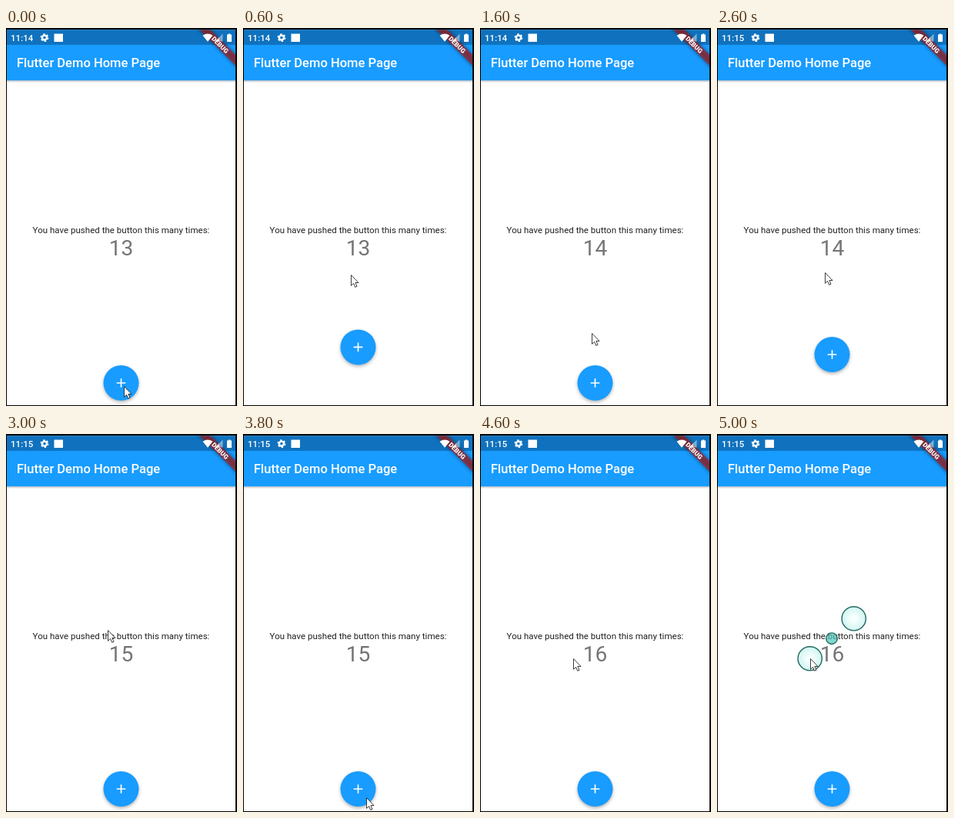
An HTML page for the animation above (5600 ms loop, 300 by 492 pixels).

```html
<!DOCTYPE html>
<html lang="en">
<head>
<meta charset="utf-8">
<title>Counter demo</title>
<style>
  html, body { margin: 0; width: 100%; height: 100%; overflow: hidden; background: #000; }
  svg { display: block; width: 300px; height: 492px; font-family: Roboto, sans-serif; }
  .medium { font-weight: 500; fill: #fff; }
  .mid { text-anchor: middle; }
  .fab { filter: drop-shadow(0 2px 2px rgba(0, 0, 0, .3)); }
  .soft { filter: blur(2.6px); }
</style>
</head>
<body>
<svg viewBox="0 0 300 492">
  <defs>
    <clipPath id="screen"><rect x="1" y="2.4" width="297" height="488.6"/></clipPath>
    <linearGradient id="barShadow" x2="0" y2="1">
      <stop stop-color="#000" stop-opacity=".24"/>
      <stop offset="1" stop-color="#000" stop-opacity="0"/>
    </linearGradient>
    <radialGradient id="glow">
      <stop offset=".2" stop-color="#f6fffe"/>
      <stop offset="1" stop-color="#c6f3ef"/>
    </radialGradient>
  </defs>

  <g clip-path="url(#screen)">
    <rect width="300" height="492" fill="#fff"/>
    <rect y="68" width="300" height="3.5" fill="url(#barShadow)"/>
    <rect width="300" height="68.2" fill="#189cff"/>
    <rect width="300" height="21.9" fill="#1072be"/>
    <text class="medium" x="14" y="51.3" font-size="16.55">Flutter Demo Home Page</text>

    <text class="mid" x="149.5" y="267.3" font-size="11.56" fill="#222">You have pushed the button this many times:</text>
    <text class="mid" id="count" x="149.5" y="296.1" font-size="28.1" fill="#757575">13</text>

    <g id="fab" class="fab">
      <circle cx="149.5" cy="462" r="23" fill="#189cff"/>
      <path d="M143.7 462h11.6M149.5 456.2v11.6" stroke="#fff" stroke-width="1.65"/>
    </g>

    <g transform="translate(298 2) rotate(45)">
      <rect class="soft" x="-40" y="23.2" width="80" height="9.9" opacity=".5"/>
      <rect x="-40" y="23.2" width="80" height="9.9" fill="#b71c1c" opacity=".63"/>
      <text class="mid" y="31.2" font-size="8.44" font-weight="900" fill="#fff">DEBUG</text>
    </g>

    <text class="medium" id="clock" x="6" y="17" font-size="11.6">11:14</text>
    <g fill="#fff">
      <circle cx="50" cy="12.6" r="3" fill="none" stroke="#fff" stroke-width="2.4"/>
      <circle cx="50" cy="12.6" r="4.5" fill="none" stroke="#fff" stroke-width="1.8" stroke-dasharray="2.4 2.312"/>
      <rect x="62.5" y="7.5" width="11.5" height="10.5"/>
      <path d="M255.5 9.8Q262 5.2 268.5 9.8L262 17.8Z"/>
      <path d="M281.5 7.5V17.5H271.5Z" opacity=".45"/>
      <path d="M277 12V17.5H271.5Z" opacity=".6"/>
      <path d="M287 8.6h1.7V7.4h2.6v1.2h1.7v9.4h-6z"/>
    </g>

    <g id="touch" stroke="#23685f" stroke-width="1.4">
      <circle cx="177.7" cy="240.3" r="15.6" fill="url(#glow)" fill-opacity=".85"/>
      <circle cx="120.7" cy="292.3" r="15.6" fill="url(#glow)" fill-opacity=".85"/>
      <circle cx="149" cy="266.2" r="7.3" fill="#4fc6b8" fill-opacity=".7"/>
    </g>

    <path id="cursor" d="M.5.6V14.3L3.6 11.4L5.7 16.3L8 15.3L5.9 10.5H10Z" fill="#fff" stroke="#1a1a1a" stroke-width=".85" stroke-linejoin="round"/>
  </g>
</svg>
<script>
  const LOOP = 5600, TICK = 200;
  const REST = { x: 153, y: 466 };
  const MAX_LIFT = 69;
  const $ = id => document.getElementById(id);
  const easeOut = (u, power) => 1 - (1 - u) ** power;

  // Pointer gestures: each starts where the last one ended.
  const move = (at, dur, x, y, ease = 1, easeX = ease) => ({ at, dur, x, y, ease, easeX });
  const swipe = (at, x, y, ease, easeX) => move(at, 600, x, y, ease, easeX);
  const glide = (at, x, y, ease) => move(at, 400, x, y, ease);
  const step = (at, x, y) => move(at, TICK, x, y);

  const moves = [
    step(0, 153, 469),
    swipe(200, 129, 290, 1.6, 0.7),
    glide(1400, 145, 400, 5),
    glide(1800, 160, 469, 2),
    swipe(2400, 132, 255, 3),
    glide(3200, 145, 428, 4.4),
    step(3600, 160, 473),
    step(3800, 145, 453),
    swipe(4000, 120.5, 292, 3.7, 1.1)
  ];

  const pulls = [
    { grab: 395, release: 1200 },
    { grab: 2460, release: 3000 },
    { grab: 4105, release: 4600 }
  ];

  function pointerAt(t) {
    let { x, y } = REST;
    for (const m of moves) {
      if (t <= m.at) break;
      const u = Math.min((t - m.at) / m.dur, 1);
      x += (m.x - x) * easeOut(u, m.easeX);
      y += (m.y - y) * easeOut(u, m.ease);
    }
    return { x, y };
  }

  // The button closes two thirds of its remaining distance every tick.
  function liftAt(t) {
    const pull = pulls.find(p => t >= p.grab && t < p.release);
    return pull ? MAX_LIFT * (1 - 3 ** ((pull.grab - t) / TICK)) : 0;
  }

  function draw() {
    const now = performance.now() % LOOP;
    const t = now - now % TICK;
    const { x, y } = pointerAt(t);
    $('cursor').setAttribute('transform', `translate(${Math.round(x)} ${Math.round(y)})`);
    $('fab').setAttribute('transform', `translate(0 ${-liftAt(t)})`);
    $('count').textContent = 13 + pulls.filter(p => t >= p.release).length;
    $('clock').textContent = t < 1800 ? '11:14' : '11:15';
    $('touch').setAttribute('visibility', t < 5000 ? 'hidden' : 'visible');
    requestAnimationFrame(draw);
  }
  draw();
</script>
</body>
</html>
```
